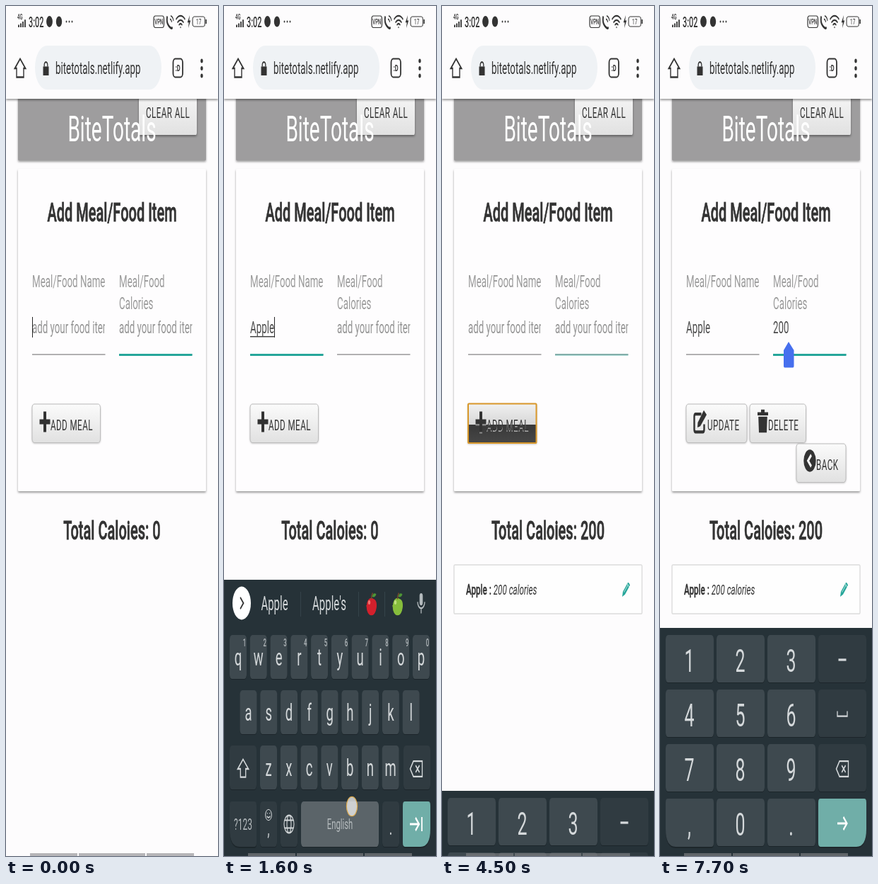
An HTML page that plays this animation: 300x1200 px, repeating every 8 s.

```html
<!DOCTYPE html>
<html lang="en">
<head>
<meta charset="utf-8">
<title>Calorie counter</title>
<style>
  html, body { margin: 0; width: 100%; height: 100%; overflow: hidden; background: #fdfcfd; }
  svg { display: block; width: 100%; height: 100%; font-family: Roboto, sans-serif; }
  .raised { filter: drop-shadow(0 2px 1.5px rgba(0, 0, 0, .38)); }
  .button { filter: drop-shadow(0 1px 1px rgba(0, 0, 0, .2)); }
  .key { filter: drop-shadow(0 1.5px 0 rgba(0, 0, 0, .25)); }
</style>
</head>
<body>
<svg id="stage" viewBox="0 0 300 1200" preserveAspectRatio="none">
  <defs>
    <linearGradient id="button" x2="0" y2="1"><stop stop-color="#fbfbfb"/><stop offset="1" stop-color="#e1e1e1"/></linearGradient>
    <linearGradient id="pressed" x2="0" y2="1">
      <stop stop-color="#f1f1f1"/><stop offset=".54" stop-color="#d6d6d6"/>
      <stop offset=".54" stop-color="#383838"/><stop offset="1" stop-color="#474747"/>
    </linearGradient>
    <clipPath id="nameClip"><rect x="36" y="430" width="104" height="50"/></clipPath>
    <clipPath id="calClip"><rect x="159" y="430" width="104.5" height="50"/></clipPath>
  </defs>
</svg>
<script>
const LOOP = 8000, STEP = 100;
const TALL = 1.8; // the phone screen is stretched vertically
const INK = '#333', TEAL = '#26a69a', PALE = '#d5d9db', KEY = '#3e494f', DARK_KEY = '#303b41';
const stage = document.getElementById('stage');
const timed = [];

function add(parent, tag, attrs = {}, content) {
  const node = document.createElementNS('http://www.w3.org/2000/svg', tag);
  for (const name in attrs) node.setAttribute(name, attrs[name]);
  if (content !== undefined) node.textContent = content;
  return parent.appendChild(node);
}
const group = (parent, attrs) => add(parent, 'g', attrs);
const rect = (parent, x, y, width, height, fill, r = 0, attrs) =>
  add(parent, 'rect', { x, y, width, height, fill, rx: r, ry: r * TALL, ...attrs });
const place = (x, y) => `translate(${x} ${y}) scale(1 ${TALL})`;
const text = (parent, x, y, content, size, fill = INK, attrs) =>
  add(parent, 'text', { transform: place(x, y), 'font-size': size, fill, ...attrs }, content);
const centered = (parent, x, y, content, size, fill, attrs) =>
  text(parent, x, y, content, size, fill, { 'text-anchor': 'middle', ...attrs });
const solid = (parent, x, y, d, fill = INK) => add(parent, 'path', { transform: place(x, y), d, fill });
const outline = (parent, x, y, d, stroke = INK, width = 1.3, attrs) =>
  add(parent, 'path', { transform: place(x, y), d, stroke, fill: 'none', 'stroke-width': width, ...attrs });
const round = { 'stroke-linecap': 'round' };
const medium = { 'font-weight': 500 };
const disc = (parent, x, y, r, fill, attrs) =>
  add(parent, 'ellipse', { cx: x, cy: y, rx: r, ry: r * TALL, fill, ...attrs });

function during(node, ...spans) { timed.push({ node, spans }); return node; }
const show = (node, on) => node.style.display = on ? '' : 'none';
const within = (t, spans) => spans.some(([from, to]) => t >= from && t < to);

function track(t, ...points) {
  if (t <= points[0][0]) return points[0][1];
  for (let i = 1; i < points.length; i++) {
    const [t0, a] = points[i - 1], [t1, b] = points[i];
    if (t < t1) return a + (b - a) * (t - t0) / (t1 - t0);
  }
  return points[points.length - 1][1];
}
const latest = (t, steps) => steps.reduce((value, [at, next]) => t >= at ? next : value, '');

// Page
const page = group(stage);
rect(page, 0, 0, 300, 1200, '#fdfcfd');
rect(page, 17, 110, 266, 108, '#9e9d9e', 1, { class: 'raised' });
rect(page, 188, 110, 82, 72, 'url(#button)', 2, { class: 'raised' });
const caps = { 'letter-spacing': .417 };
text(page, 198, 158, 'CLEAR ALL', 11.67, INK, caps);
centered(page, 150, 191, 'BiteTotals', 28, '#fff');

rect(page, 17, 230, 266, 455, '#fefdfe', 1, { class: 'raised' });
const heading = { ...medium, stroke: INK, 'stroke-width': .45 };
centered(page, 150, 304, 'Add Meal/Food Item', 20, INK, heading);
text(page, 37, 397, 'Meal/Food Name', 13.33, '#9a9a9a');
text(page, 160, 397, 'Meal/Food', 13.33, '#9a9a9a');
text(page, 160, 428, 'Calories', 13.33, '#9a9a9a');
const total = centered(page, 150, 753, '', 20, INK, heading);

function makeField(x, clip) {
  const inner = group(page, { 'clip-path': `url(#${clip})` });
  const value = text(inner, x, 462, '', 13.33);
  const cursor = rect(inner, x, 439, 1, 29, '#222');
  rect(page, x, 491.2, 103.5, 1.6, '#9e9e9e');
  const active = rect(page, x, 491, 103.5, 3, TEAL);
  return { x, value, cursor, active };
}
const nameField = makeField(37, 'nameClip');
const calField = makeField(160, 'calClip');
const composing = during(rect(page, 37, 466, 34, 1.5, '#444'), [900, 1700]);

function updateField(field, content, cursorOn, glow) {
  field.value.textContent = content || 'add your food item';
  field.value.setAttribute('fill', content ? '#4c4c4c' : '#949494');
  const width = content ? field.value.getComputedTextLength() : 0;
  field.cursor.setAttribute('x', field.x + width);
  show(field.cursor, cursorOn);
  field.active.setAttribute('opacity', glow);
  return width;
}

// Buttons
function button(parent, x, y, width, textX, label) {
  rect(parent, x, y, width, 54.5, 'url(#button)', 3, { class: 'button', stroke: '#bcbcbc', 'stroke-width': 1 });
  text(parent, textX, y + 37, label, 11.67, INK, caps);
}
const PLUS = 'M-2-8H2V-2H7.5V2H2V8H-2V2H-7.5V-2H-2Z';
const addButton = during(group(page), [0, 4400]);
button(addButton, 37, 562, 96.5, 63, 'ADD MEAL');
solid(addButton, 55, 587, PLUS);
const focused = during(group(page), [4400, 5500]);
rect(focused, 37, 561.5, 96.5, 55.5, 'url(#pressed)', 1, { class: 'button', stroke: '#d9982a', 'stroke-width': 2 });
text(focused, 63, 601, 'ADD MEAL', 11.67, 'rgba(255,255,255,.55)', caps);
text(focused, 63, 599, 'ADD MEAL', 11.67, INK, caps);
solid(focused, 55, 589, PLUS, 'rgba(255,255,255,.4)');
solid(focused, 55, 587, PLUS);

const editing = during(group(page), [5500, LOOP]);
button(editing, 37, 562, 86, 67, 'UPDATE');
outline(editing, 56.5, 587, 'M2-6H-6Q-8-6-8-4V6Q-8 8-6 8H4Q6 8 6 6V2', INK, 2.4);
solid(editing, 56.5, 587, 'M-3.5 4.5L-3 .5 5.5-9 9.5-5.5.5 3.5Z');
button(editing, 127, 562, 79.5, 153, 'DELETE');
solid(editing, 145.5, 586, 'M-7.5-7H-2.5V-9H2.5V-7H7.5V-4.5H-7.5ZM-6.3-3.5H6.3L5.5 9H-5.5Z');
button(editing, 193, 618, 70, 221, 'BACK');
disc(editing, 212, 642, 8.7, INK);
outline(editing, 212, 642, 'M2-4.5L-2.5 0 2 4.5', '#fff', 2.4);

// Meal list
const item = during(group(page), [4400, LOOP]);
rect(item, 17, 789, 266, 69, '#fefefe', 1, { stroke: '#dcdcdc', 'stroke-width': 1.4 });
const entry = text(item, 34, 831, '', 11.67);
add(entry, 'tspan', { ...medium, stroke: INK, 'stroke-width': .25 }, 'Apple :');
add(entry, 'tspan', { 'font-style': 'italic' }, ' 200 calories');
solid(item, 260.5, 824, 'M-5.5 5.5L-4.5 1.5 2.5-5.5Q4-6 5.5-3.5L-1.5 3.7Z', TEAL);
outline(item, 260.5, 824, 'M-3 2L3-4M1.2-5L4.5-2', '#b9e2dd', .7);
during(add(page, 'path', {
  d: 'M182 474L189.5 486V508Q189.5 510.5 188 510.5H176.5Q175 510.5 175 508V486Z', fill: '#466fee'
}), [7500, LOOP]);

// Status and address bars
const bar = group(stage);
rect(bar, 0, 0, 300, 131, '#fdfcfd', 0, { class: 'raised' });
text(bar, 16, 19, '4G', 6, INK, medium);
outline(bar, 17, 30, 'M1 0V-2M4 0V-3M7 0V-4.5M10 0V-6', INK, 1.8);
text(bar, 32, 30, '3:02', 10.9, INK, medium);
disc(bar, 61.5, 22, 4.4, INK);
disc(bar, 75, 22, 4.2, INK);
outline(bar, 89.5, 22, 'M-4 0h0M0 0h0M4 0h0', INK, 1.8, round);
rect(bar, 209, 14, 14.5, 16.5, 'none', 2.5, { stroke: INK, 'stroke-width': 1.2 });
centered(bar, 216.3, 26, 'VPN', 6, INK, medium);
outline(bar, 231.5, 23, 'M-3.5-4Q-4.5 0-1.5 2.5T3.5 4.5', INK, 1.9, round);
outline(bar, 232, 22, 'M0-2a3 3 0 0 1 2.5 2.5M1-4.5a5 5 0 0 1 4 4', INK, 1);
outline(bar, 247, 22, 'M-6-2a8.5 8.5 0 0 1 12 0M-4 .5a5.7 5.7 0 0 1 8 0M-2 2.5a2.8 2.8 0 0 1 4 0M0 4.5h0', INK, 1.3, round);
solid(bar, 259, 22, 'M1-5L-2.3.7H-.3L-1 5 2.3-.9H.2Z');
rect(bar, 264, 15, 17.5, 14, 'none', 2.2, { stroke: INK });
rect(bar, 282.5, 19, 1.5, 6, INK);
centered(bar, 272.7, 26, '17', 6.5);
outline(bar, 20, 88, 'M-7.5 0L0-7.5 7.5 0H5V7H-5V0Z', INK, 1.4);
rect(bar, 41, 56, 179, 62, '#eff2f5', 17.2);
solid(bar, 56.5, 89, 'M-4-2H4V5H-4Z');
outline(bar, 56.5, 89, 'M-2.3-2V-3.2A2.3 2.3 0 0 1 2.3-3.2V-2');
text(bar, 70, 96, 'bitetotals.netlify.app', 13.33);
rect(bar, 236.5, 74.5, 13.5, 26, 'none', 3, { stroke: INK, 'stroke-width': 1.8 });
centered(bar, 243.2, 92, ':D', 7.5, INK, { 'font-weight': 700 });
outline(bar, 277, 88, 'M0-5.8h0M0 0h0M0 5.8h0', INK, 3.4, round);

// Letter keyboard
const letters = group(stage);
rect(letters, 0, 810, 300, 390, '#263238');
const key = (parent, x, y, width, height, fill = KEY) => rect(parent, x, y, width, height, fill, 3.5, { class: 'key' });
// Key with one large corner at its bottom left or bottom right
function cornerKey(parent, x, y, width, height, fill, left) {
  const h = height / TALL, w = width;
  const d = left
    ? `M3 0H${w - 3}Q${w} 0 ${w} 3V${h - 3}Q${w} ${h} ${w - 3} ${h}H14Q0 ${h} 0 ${h - 14}V3Q0 0 3 0Z`
    : `M3 0H${w - 3}Q${w} 0 ${w} 3V${h - 14}Q${w} ${h} ${w - 14} ${h}H3Q0 ${h} 0 ${h - 3}V3Q0 0 3 0Z`;
  solid(parent, x, y, d, fill).setAttribute('class', 'key');
}
const PITCH = 28.77;
const keyLabels = [];
[['qwertyuiop', 20, 888], ['asdfghjkl', 34.5, 966], ['zxcvbnm', 63, 1044]].forEach(([row, left, y]) => {
  [...row].forEach((letter, i) => {
    const x = left + i * PITCH;
    key(letters, x - 12, y, 24, 62);
    keyLabels.push([centered(letters, x, y + 43, letter, 18.5, PALE), letter]);
    if (y === 888) centered(letters, x + 9, 904, (i + 1) % 10, 7.8, '#b4babd', medium);
  });
});
const BACKSPACE = 'M-4-6H8.5V6H-4L-8.5 0ZM-.8-2.7L4.6 2.7M4.6-2.7L-.8 2.7';
const SHIFT = 'M0-7.5L7.5 0H3.7V6.5H-3.7V0H-7.5Z';
key(letters, 8, 1044, 38, 62, DARK_KEY);
during(solid(letters, 27, 1077, SHIFT, '#a4abae'), [0, 900]);
during(outline(letters, 27, 1077, SHIFT, PALE), [900, LOOP]);
key(letters, 254, 1044, 38, 62, DARK_KEY);
outline(letters, 272, 1077, BACKSPACE, PALE);
cornerKey(letters, 8, 1123, 38, 64, DARK_KEY, true);
centered(letters, 27, 1163, '?123', 12, '#b4babd');
for (const [x, width, fill] of [[51, 24, DARK_KEY], [80, 24, DARK_KEY], [109, 110, KEY], [224, 24, DARK_KEY]])
  key(letters, x, 1123, width, 64, fill);
disc(letters, 63, 1142, 4.3, 'none', { stroke: PALE });
outline(letters, 63, 1142, 'M-1.6-1.3h0M1.6-1.3h0M-2 1.2Q0 3 2 1.2', PALE, 1, round);
centered(letters, 63, 1171, ',', 15, PALE);
outline(letters, 92, 1155, 'M-7 0A7 7 0 1 0 7 0A7 7 0 1 0-7 0ZM-3 0A3 7 0 1 0 3 0A3 7 0 1 0-3 0ZM-6-3H6M-6 3H6', PALE, 1.1);
centered(letters, 164, 1162, 'English', 11.3, '#a9b0b3');
centered(letters, 236, 1170, '.', 17, PALE);
cornerKey(letters, 253, 1123, 39, 64, '#70aea8', false);
outline(letters, 271, 1155, 'M-8 0H5M0-5L5 0 0 5M9-5.5V5.5', '#fff', 1.8);

// Toolbar above the letters
disc(letters, 25, 843, 13, '#fff');
outline(letters, 279, 843, 'M0-5.5V-.5', '#b3babd', 4.6, round);
outline(letters, 279, 843, 'M-5-1A5 5 0 0 0 5-1M0 4V8', '#b3babd');
const TOOL = '#9aa3a7';
const tools = during(group(letters), [0, 900]);
outline(tools, 25, 843, 'M2-4.5L-2.5 0 2 4.5', INK, 1.5);
outline(tools, 62, 844, 'M-6.5-6.5H6.5V2L2 6.5H-6.5ZM-3-2h0M3-2h0M-3 1Q0 4.5 3 1', TOOL, 1.6, round);
centered(tools, 102, 851, 'GIF', 11.5, TOOL, { 'font-weight': 700 });
const ring = r => `M${-r} 0A${r} ${r} 0 1 0 ${r} 0A${r} ${r} 0 1 0 ${-r} 0Z`;
outline(tools, 144, 844, ring(4.5), TOOL, 3.2);
outline(tools, 144, 844, ring(6.6), TOOL, 2, { 'stroke-dasharray': '2.6 2.58' });
rect(tools, 178, 832, 14, 25, TOOL, 1.5);
rect(tools, 211, 828, 1, 32, '#3a464c');
outline(tools, 237, 844, 'M-5 0h0M0 0h0M5 0h0', TOOL, 3.4, round);

const suggestions = during(group(letters), [900, LOOP]);
outline(suggestions, 25, 843, 'M-2-4.5L2.5 0-2 4.5', INK, 1.5);
const firstWord = centered(suggestions, 71.5, 853, '', 15, PALE);
const secondWord = centered(suggestions, 149, 853, '', 15, PALE);
for (const x of [108, 190, 227]) rect(suggestions, x, 827, 1, 35, '#35434a');
const emoji = during(group(suggestions), [1400, LOOP]);
for (const [x, fill, shine] of [[208.5, '#d3202c', '#f0736f'], [245.5, '#86bd3c', '#bfe07d']]) {
  solid(emoji, x, 847, 'M0-4.5C4-7 8-4 7.5 0S4 8 0 7C-4 8-7-3-7.5 0S-4-7 0-4.5Z', fill);
  disc(emoji, x, 848, 6.8, fill);
  disc(emoji, x - 3, 842, 1.7, shine);
  outline(emoji, x, 834, 'M0 2Q0-1 2-3', '#7a4b2a', 1.4);
  solid(emoji, x, 834, 'M1 0Q3-4 7-2Q5 1 1 0Z', '#4d9636');
}

// Number keyboard
const numbers = group(stage);
rect(numbers, 0, 878, 300, 322, '#263238');
const COLUMNS = [8, 80, 152, 224], ROWS = [888, 965, 1042, 1119];
['123-', '456_', '789<', ',0.>'].forEach((row, r) => [...row].forEach((label, c) => {
  const x = COLUMNS[c], y = ROWS[r];
  if (r === 3 && c % 3 === 0) cornerKey(numbers, x, y, 68, 68, c ? '#70aea8' : KEY, !c);
  else key(numbers, x, y, 68, 67, c === 3 ? DARK_KEY : KEY);
  if (c < 3) centered(numbers, x + 33.5, y + 52, label, 25, PALE);
}));
outline(numbers, 258, 923, 'M-5.5 0H5.5', PALE, 1.8);
outline(numbers, 258, 999, 'M-7-2V2H7V-2', PALE);
outline(numbers, 258, 1077, BACKSPACE, PALE);
outline(numbers, 258, 1154, 'M-7 0H6.5M1.5-5L6.5 0 1.5 5', '#fff', 1.8);

// Pressed keys, letter popups and touches
for (const [from, to, x, y, width, height] of [
  [1600, 1700, 109, 1123, 110, 64], [2100, 2200, 253, 1123, 39, 64],
  [3000, 3100, 80, 888, 68, 67], [3600, 3700, 80, 1119, 68, 67]
]) during(rect(stage, x, y, width, height, 'rgba(255,255,255,.15)', 3.5), [from, to]);

for (const [at, letter, x, bottom] of [
  [800, 'A', 34.5, 1029], [1000, 'p', 279, 951], [1100, 'p', 279, 951], [1200, 'l', 264.7, 1029], [1300, 'e', 77.5, 951]
]) {
  const popup = during(group(stage), [at, at + STEP]);
  rect(popup, x - 16, bottom - 173, 32, 173, '#37424a', 3);
  centered(popup, x, bottom - 115, letter, 23, '#fff');
  centered(popup, x + 8, bottom - 94, '...', 11, PALE);
}
for (const [from, to, x, y, alpha] of [
  [800, 900, 41, 1010, .8], [1000, 1200, 281, 925, .8], [1200, 1300, 267, 1003, .8], [1300, 1400, 79, 925, .8],
  [1600, 1700, 181, 1130, .8], [2100, 2200, 272, 1150, .8], [3000, 3100, 113, 925, .8], [3200, 3400, 113, 1131, .8],
  [3600, 3800, 113, 1140, .8], [4300, 4400, 108.5, 592, .65], [5400, 5500, 259.5, 824, .5], [7200, 7300, 182, 455, .65]
]) during(disc(stage, x, y, 7.6, `rgba(235,235,235,${alpha})`, { stroke: '#dca94c', 'stroke-width': 1.2 }), [from, to]);

// Navigation bar
for (const [x, width] of [[34, 67], [103, 94], [199, 67]]) rect(stage, x, 1196, width, 4, 'rgba(135,135,138,.6)');

function slide(node, y, visible) {
  node.setAttribute('transform', `translate(0 ${y})`);
  show(node, visible);
}

function draw(t) {
  for (const { node, spans } of timed) show(node, within(t, spans));

  const name = latest(t, [[900, 'A'], [1000, 'Ap'], [1100, 'App'], [1200, 'Appl'], [1300, 'Apple'], [4400, ''], [5500, 'Apple']]);
  const calories = latest(t, [[3100, '2'], [3400, '20'], [3600, '200'], [4400, ''], [5500, '200']]);
  const nameWidth = updateField(nameField, name, within(t, [[0, 400], [900, 1800]]),
    track(t, [0, 0], [300, 1], [2100, 1], [2400, 0]));
  updateField(calField, calories, within(t, [[2300, 2700], [2900, 3900], [4100, 4300]]),
    track(t, [0, 1], [300, 0], [2100, 0], [2400, 1], [4300, 1], [4600, 0], [7200, 0], [7500, 1]));
  composing.setAttribute('width', nameWidth);
  total.textContent = `Total Caloies: ${t < 4400 ? 0 : 200}`;

  const upper = t < 900;
  for (const [label, letter] of keyLabels) label.textContent = upper ? letter.toUpperCase() : letter;
  firstWord.textContent = t < 1100 ? name : 'Apple';
  secondWord.textContent = t < 1100 ? '' : "Apple's";

  slide(letters, track(t, [100, 390], [200, 260], [300, 60], [400, 0]), t < 2400);
  slide(numbers, track(t, [4300, 0], [4400, 50], [4500, 230], [4600, 330],
    [7300, 330], [7400, 220], [7500, 60], [7600, 0]), t >= 2400);
}

const start = performance.now();
function tick() {
  const t = (performance.now() - start) % LOOP;
  draw(Math.floor(t / STEP) * STEP);
  requestAnimationFrame(tick);
}
tick();
</script>
</body>
</html>
```
